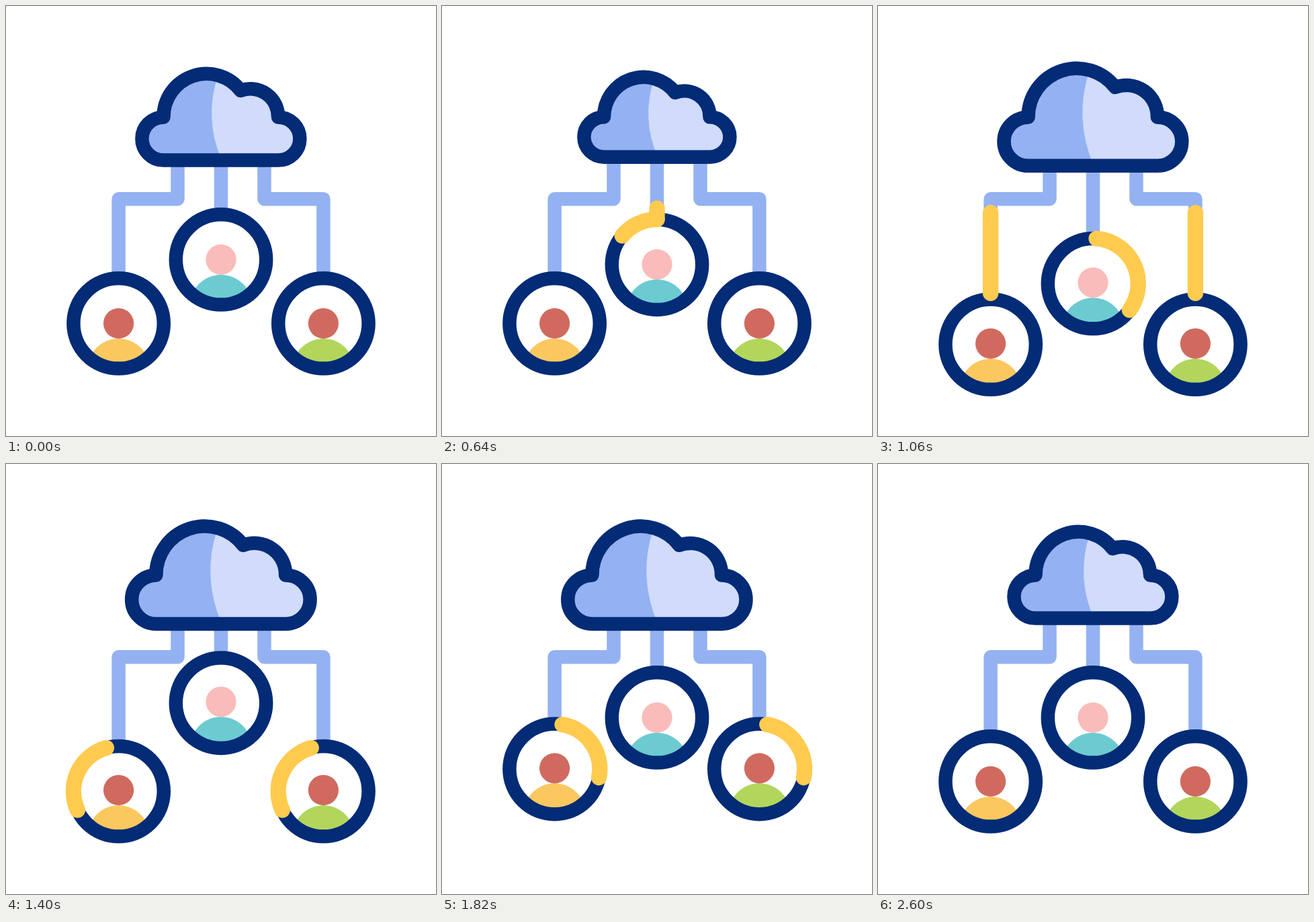
An HTML page with a canvas that plays this animation: 640 by 640 pixels, repeating every 3 s.

```html
<!DOCTYPE html>
<html lang="en">
<head>
<meta charset="utf-8">
<title>Cloud users</title>
<style>
  html, body { margin: 0; width: 100%; height: 100%; overflow: hidden; background: #fff; }
  canvas { display: block; }
</style>
</head>
<body>
<canvas id="stage" width="640" height="640"></canvas>
<script>
const ctx = document.getElementById('stage').getContext('2d');
const LOOP = 3000, RING = 67.2, STROKE = 20.5, GLOW = 23.4;
const NAVY = '#032b76', BLUE = '#94b1f2', PALE = '#d1dbfa', YELLOW = '#ffcb4f';

const cloudRight = 'A64 64 0 0 1 29.3 -39 A41 41 0 0 1 85 .4 A32.1 32.1 0 0 1 85.5 64.6 Z';
const cloud = new Path2D('M-85.5 64.6 A32.1 32.1 0 0 1 -85.5 .4 ' + cloudRight);
const cloudLight = new Path2D('M1.2 64.6 A170 170 0 0 1 -4.3 -62 ' + cloudRight);

// Each user: ring position, wire route from the cloud, colours, timings
const side = { y: 472.4, delay: 200, wire: [500, 1100, 700, 1300], orbit: [1100, 1900, 1300, 2100] };
const users = [
  { x: 167.6, from: 255.5, head: '#d06a5f', body: '#fac85e', ...side },
  { x: 472.4, from: 384.5, head: '#d06a5f', body: '#b2d65c', ...side },
  { x: 320, from: 320, head: '#fabcba', body: '#6ccbd0', y: 377.4, delay: 0,
    wire: [200, 500, 400, 700], orbit: [500, 1100, 700, 1300] }
];

function ease(t, start, end) {
  const u = Math.min(1, Math.max(0, (t - start) / (end - start)));
  return u * u * (3 - 2 * u);
}

// Eased keyframes: [time, value] pairs
function track(t, keys) {
  let value = keys[0][1];
  for (let i = 1; i < keys.length; i++) {
    value += (keys[i][1] - keys[i - 1][1]) * ease(t, keys[i - 1][0], keys[i][0]);
  }
  return value;
}

const bounce = (t, down, up) => track(t, [[500, 0], [1000, down], [1500, -up], [1800, 0]]);

function stroke(color, width) {
  ctx.strokeStyle = color;
  ctx.lineWidth = width;
  ctx.stroke();
}

function disc(x, y, r, color) {
  ctx.beginPath();
  ctx.arc(x, y, r, 0, 2 * Math.PI);
  ctx.fillStyle = color;
  ctx.fill();
}

function traceWire(user, shift) {
  const end = user.y - RING + shift * 0.85;
  const points = user.x === user.from
    ? [[user.x, 165], [user.x, end]]
    : [[user.from, 165], [user.from, 287.2], [user.x, 287.2], [user.x, end]];
  ctx.beginPath();
  points.forEach(p => ctx.lineTo(...p));
  return end - 165 + Math.abs(user.x - user.from);
}

function drawUser(user, t) {
  const shift = bounce(t - user.delay, 38.5, 28.5);
  const { x } = user, y = user.y + shift;
  const personY = user.y + bounce(t - user.delay, 37, 30.5);

  traceWire(user, shift);
  stroke(BLUE, STROKE);

  disc(x, y, RING, '#fff');
  ctx.save();
  ctx.clip();
  disc(x, personY + 68.5, 46, user.body);
  disc(x, personY, 22.6, user.head);
  ctx.restore();
  ctx.beginPath();
  ctx.arc(x, y, RING, 0, 2 * Math.PI);
  stroke(NAVY, STROKE);

  const [head, tail] = trim(t, user.wire);
  if (head > tail) {
    const length = traceWire(user, shift);
    ctx.setLineDash([(head - tail) * length, 2000]);
    ctx.lineDashOffset = -tail * length;
    stroke(YELLOW, GLOW);
    ctx.setLineDash([]);
  }

  const [lead, trail] = trim(t, user.orbit);
  if (lead > trail) {
    const angle = part => -Math.PI / 2 - part * 2 * Math.PI;
    ctx.beginPath();
    ctx.arc(x, y, RING, angle(trail), angle(lead), true);
    stroke(YELLOW, GLOW);
  }
}

function trim(t, [headStart, headEnd, tailStart, tailEnd]) {
  return [ease(t, headStart, headEnd), ease(t, tailStart, tailEnd)];
}

function drawCloud(t) {
  const scale = track(t, [[200, 1], [500, 0.89], [1100, 1.13], [1800, 1.13], [2300, 0.89], [2600, 1]]);
  ctx.save();
  ctx.translate(320, 165);
  ctx.scale(scale, scale);
  ctx.fillStyle = BLUE;
  ctx.fill(cloud);
  ctx.fillStyle = PALE;
  ctx.fill(cloudLight);
  ctx.strokeStyle = NAVY;
  ctx.lineWidth = STROKE / scale;
  ctx.stroke(cloud);
  ctx.restore();
}

function draw() {
  const t = performance.now() % LOOP;
  ctx.fillStyle = '#fff';
  ctx.fillRect(0, 0, 640, 640);
  ctx.lineCap = ctx.lineJoin = 'round';
  users.forEach(user => drawUser(user, t));
  drawCloud(t);
  requestAnimationFrame(draw);
}
draw();
</script>
</body>
</html>
```
